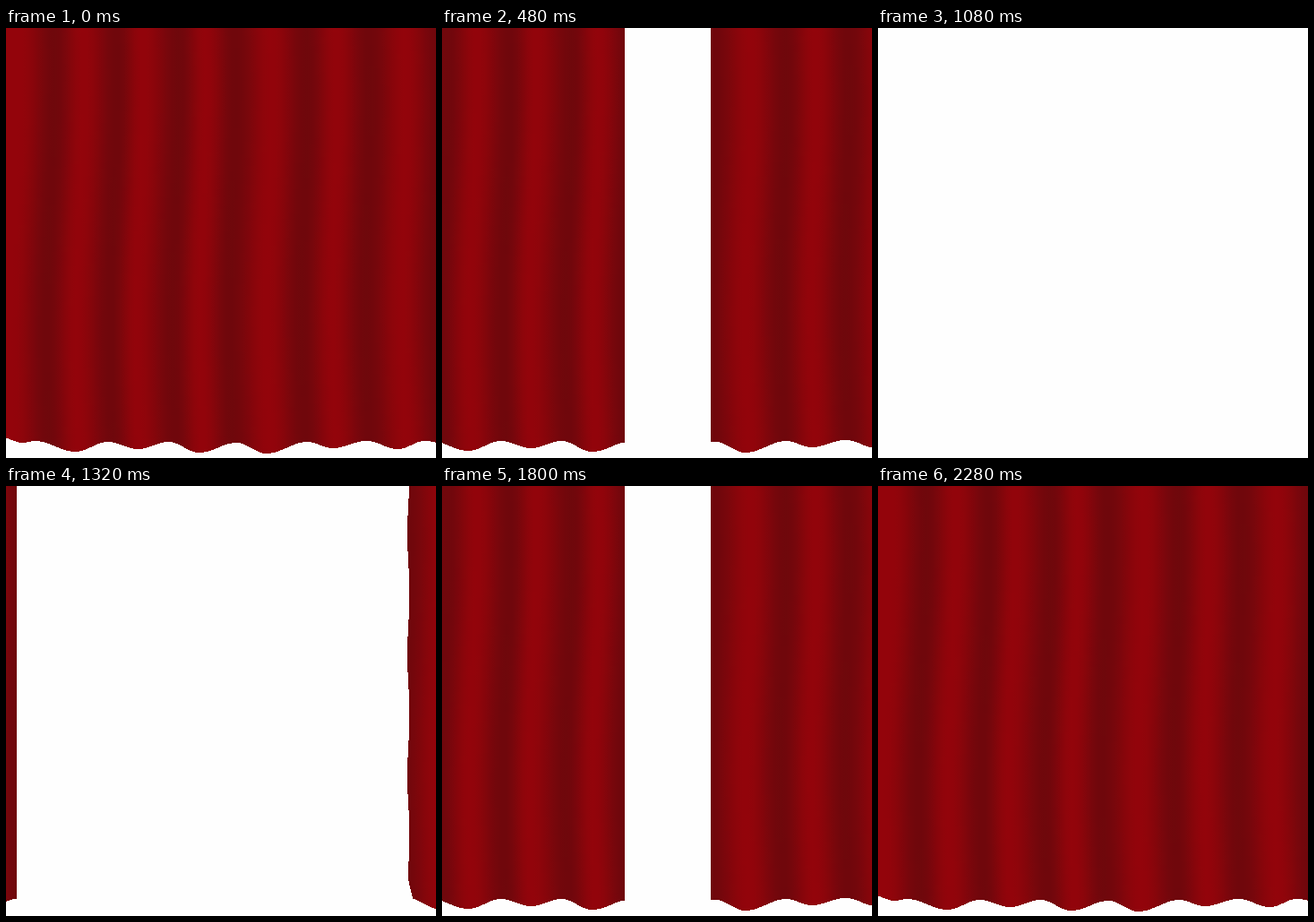
An HTML page with a canvas that plays this animation: 480 px wide and 480 px high, repeating every 2.4 s.

```html
<!DOCTYPE html>
<html lang="en">
<head>
<meta charset="utf-8">
<title>Curtain</title>
<style>
html, body { margin: 0; width: 100%; height: 100%; overflow: hidden; background: #fefefe; }
canvas { display: block; width: 480px; height: 480px; }
</style>
</head>
<body>
<canvas id="stage" width="480" height="480"></canvas>
<script>
const SIZE = 480, SPLIT = 252, STEP = 120, STEPS = 20;
const ctx = document.getElementById('stage').getContext('2d');

// Turning points of the cloth: crests and valleys alternate, starting with a crest
const folds = [14, 52, 84, 122, 150, 191, 220, 253, 294, 333, 366, 403, 443, 480];
const hemTurns = [
  [-8, 456], [18, 463], [32, 461], [77, 473], [113, 462], [147, 470], [181, 462], [215, 474],
  [257, 463], [290, 475], [336, 462], [364, 469], [402, 461], [437, 470], [467, 461], [490, 464]
];

const mix = (a, b, t) => a + (b - a) * t;

// Smooth curve that levels out at each turning point
function wave(points, x) {
  const next = points.findIndex(p => p[0] > x);
  if (next === 0) return points[0][1];
  if (next < 0) return points.at(-1)[1];
  const [x0, y0] = points[next - 1], [x1, y1] = points[next];
  return mix(y0, y1, (1 - Math.cos(Math.PI * (x - x0) / (x1 - x0))) / 2);
}

const light = folds.map((x, i) => [x, i % 2 ? 0.12 : 0.95]);

// Folds fan out toward the hem and sway a little on the way down
const drift = (x, y) => (x - 290) * y / 24000 + 3 * Math.sin(y / 80 + 0.7);

function shade(v) {
  return `rgb(${mix(106, 149, v)},${mix(8, 4, v)},${mix(12, 11, v)})`;
}

function paintCurtain() {
  const cloth = document.createElement('canvas');
  cloth.width = cloth.height = SIZE;
  const c = cloth.getContext('2d');
  c.beginPath();
  for (let x = 0; x < SIZE; x++) c.rect(x, 0, 1, Math.round(wave(hemTurns, x)));
  c.clip();
  for (let y = 0; y < SIZE; y++) {
    const row = c.createLinearGradient(0, 0, SIZE, 0);
    for (let x = 0; x <= SIZE; x += 6) {
      row.addColorStop(x / SIZE, shade(wave(light, x - drift(x, y))));
    }
    c.fillStyle = row;
    c.fillRect(0, y, SIZE, 1);
  }
  return cloth;
}

const cloth = paintCurtain();

const straight = () => SPLIT;
const frayed = y => Math.round(257.2 + 1.2 * Math.cos((y - 120) / 21.5) + Math.max(0, y - 436) * 0.25);

function drawLeft(dx, dy) {
  ctx.drawImage(cloth, 0, 0, SPLIT, SIZE, -dx, dy, SPLIT, SIZE);
}

function drawRight(dx, dy, edge) {
  ctx.save();
  ctx.translate(dx, 0);
  ctx.beginPath();
  for (let y = 0; y < SIZE; y++) ctx.rect(edge(y), y, SIZE - edge(y), 1);
  ctx.clip();
  ctx.drawImage(cloth, 0, dy);
  ctx.restore();
}

function draw(now) {
  const slot = Math.floor(now / STEP) % STEPS;
  const step = Math.min(slot, STEPS - 1 - slot);
  const slow = 12 * Math.min(step, 4), fast = Math.max(step - 4, 0);
  const left = slow + 48 * fast, right = slow + 36 * fast;
  const lift = -Math.min(3, Math.round(left / 48));

  ctx.fillStyle = '#fefefe';
  ctx.fillRect(0, 0, SIZE, SIZE);
  drawLeft(left, lift);
  drawRight(right, lift, step < 6 ? straight : frayed);
  requestAnimationFrame(() => draw(performance.now() - start));
}

const start = performance.now();
draw(0);
</script>
</body>
</html>
```
